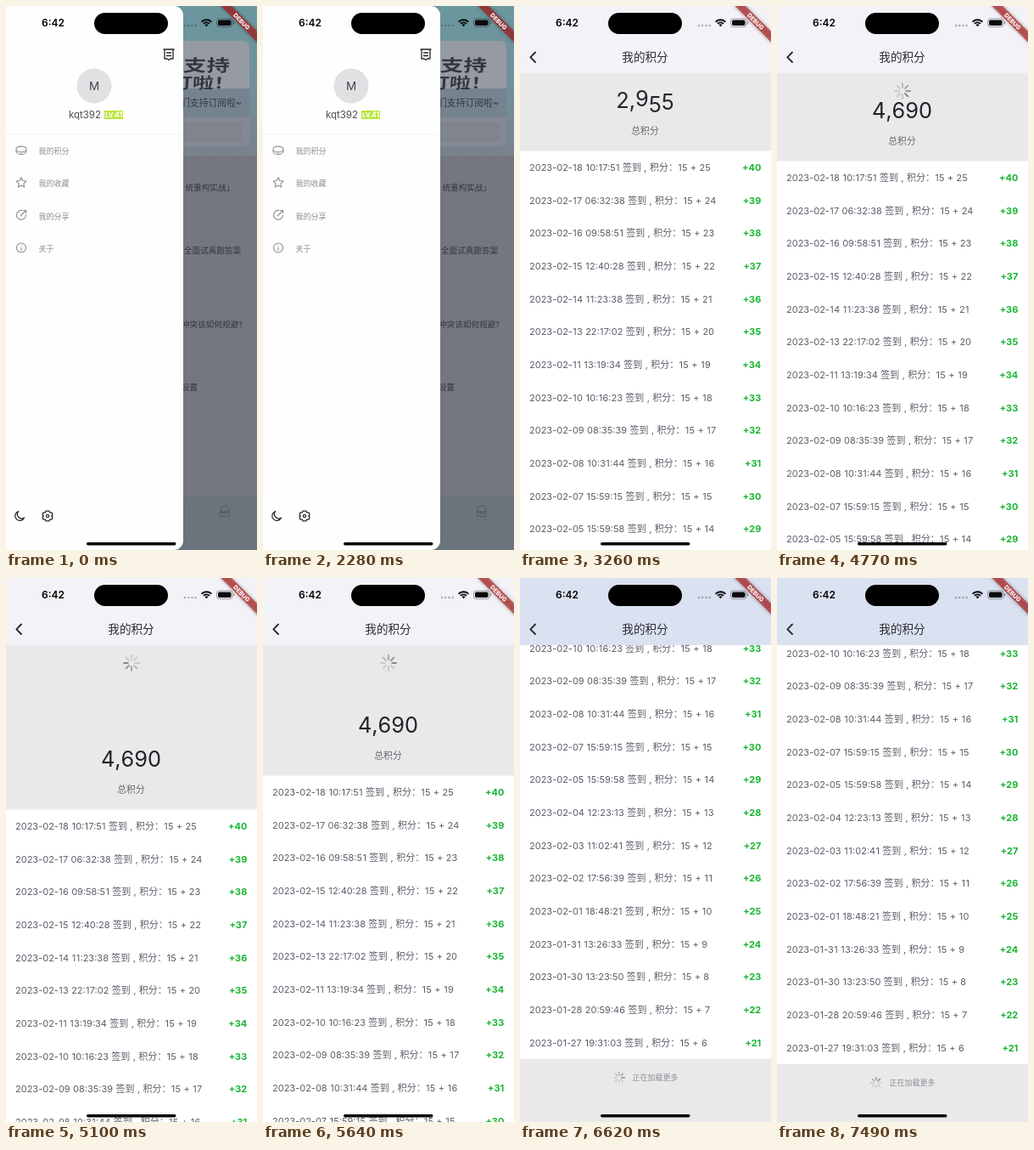
An HTML page with a canvas that plays this animation: 296x640 px, repeating every 7.57 s.

```html
<!DOCTYPE html>
<html lang="zh">
<head>
<meta charset="utf-8">
<title>我的积分</title>
<style>
html, body { margin: 0; width: 100%; height: 100%; overflow: hidden; background: #fff; }
canvas { display: block; width: 296px; height: 640px; }
</style>
</head>
<body>
<canvas id="stage"></canvas>
<script>
const W = 296, H = 640, LOOP = 7570;
const FONT = 'Inter, "Noto Sans CJK SC", "Noto Sans CJK", sans-serif';
const ROW = 38.66, BAR = 79, HEAD = 91.5;
const PAGE = '#e9e9ea', INK = '#23242b';

const canvas = document.getElementById('stage');
const c = canvas.getContext('2d');
const dpr = window.devicePixelRatio || 1;
canvas.width = W * dpr;
canvas.height = H * dpr;

const dates = `02-18 10:17:51,02-17 06:32:38,02-16 09:58:51,02-15 12:40:28,02-14 11:23:38,
02-13 22:17:02,02-11 13:19:34,02-10 10:16:23,02-09 08:35:39,02-08 10:31:44,
02-07 15:59:15,02-05 15:59:58,02-04 12:23:13,02-03 11:02:41,02-02 17:56:39,
02-01 18:48:21,01-31 13:26:33,01-30 13:23:50,01-28 20:59:46,01-27 19:31:03`.split(',').map(s => s.trim());

// The screen refreshes in discrete steps
const run = (start, n, step) => Array.from({ length: n }, (_, i) => start + i * step);
const ticks = [0, ...run(2280, 4, 103.3), 2840, ...run(3150, 4, 110), 3630,
  ...run(3780, 4, 110), ...run(4770, 7, 110), ...run(5530, 7, 108.3),
  ...run(6290, 7, 110), ...run(7060, 5, 107.5)];

const scrollKeys = [[4660, 0], [4770, 12], [4880, 42], [4990, 78], [5100, 102], [5210, 108],
  [5320, 84], [5430, 68], [5530, 63], [5640, 62], [5860, 62], [5970, 46], [6070, 18], [6180, 3],
  [6290, -40], [6400, -170], [6510, -300], [6620, -378], [6730, -392], [6840, -386],
  [6950, -378], [7060, -373.5], [7170, -371.8]];

const clamp = (v, a = 0, b = 1) => Math.min(b, Math.max(a, v));

function track(keys, t) {
  if (t <= keys[0][0]) return keys[0][1];
  for (let i = 1; i < keys.length; i++) {
    const [t0, v0] = keys[i - 1], [t1, v1] = keys[i];
    if (t <= t1) return v0 + (v1 - v0) * (t - t0) / (t1 - t0);
  }
  return keys[keys.length - 1][1];
}

function text(s, x, y, size, color, align = 'left', weight = 400) {
  c.font = `${weight} ${size}px ${FONT}`;
  c.textAlign = align;
  c.textBaseline = 'alphabetic';
  c.fillStyle = color;
  c.fillText(s, x, y + size * 0.365);
}

// Running text with looser word gaps and a little air around each 1
function looseText(s, x, y, size, color) {
  const air = size * 0.025;
  c.wordSpacing = '0.3px';
  for (const part of s.split(/(1)/)) {
    const pad = part === '1' ? air : 0;
    text(part, x + pad, y, size, color);
    x += c.measureText(part).width + pad * 2;
  }
  c.wordSpacing = '0px';
}

function rect(x, y, w, h, color) {
  c.fillStyle = color;
  c.fillRect(x, y, w, h);
}

function round(x, y, w, h, r, color) {
  c.beginPath();
  c.roundRect(x, y, w, h, r);
  c.fillStyle = color;
  c.fill();
}

function disc(x, y, r, color) {
  c.beginPath();
  c.arc(x, y, r, 0, 7);
  c.fillStyle = color;
  c.fill();
}

function stroke(d, color, width = 1) {
  c.strokeStyle = color;
  c.lineWidth = width;
  c.lineCap = c.lineJoin = 'round';
  c.stroke(new Path2D(d));
}

function at(x, y, draw) {
  c.save();
  c.translate(x, y);
  draw();
  c.restore();
}

function spinner(x, y, r, t) {
  const head = Math.floor(t / 125 + 5.5);
  at(x, y, () => {
    for (let i = 0; i < 8; i++) {
      const age = (((head - i) % 8) + 8) % 8;
      const alpha = Math.max(47, 147 - age * 25) / 255;
      round(-r * 0.1, -r, r * 0.2, r * 0.67, r * 0.1, `rgba(60,60,67,${alpha})`);
      c.rotate(Math.PI / 4);
    }
  });
}

function backdrop() {
  rect(0, 0, W, H, '#74777e');
  const sky = c.createLinearGradient(0, 0, 0, 176);
  sky.addColorStop(0, '#6b979f');
  sky.addColorStop(0.6, '#718f9a');
  sky.addColorStop(1, '#7a828c');
  rect(0, 0, W, 176, sky);
  round(10, 41, 277, 124, 7, '#858993');
  round(10, 41, 277, 62, [7, 7, 0, 0], '#969aa3');
  rect(10, 97, 277, 34, '#75838f');
  round(20, 136, 259, 24, 6, '#7f848d');
  const ink = '#34363f';
  const headline = (s, x, y, size) => at(x, y, () => {
    c.transform(1.25, 0, -0.06, 0.9, 0, 0);
    text(s, 0, 0, size, ink, 'right', 700);
  });
  headline('支持', 264, 70, 22);
  headline('订啦！', 270, 90, 20);
  text('们支持订阅啦~', 278, 114, 10.8, ink, 'right');
  text('统重构实战」', 269, 213, 9.6, ink, 'right');
  text('全面试真题答案', 277, 287, 9.6, ink, 'right');
  text('冲突该如何规避?', 279, 374, 9.6, ink, 'right');
  text('设置', 226, 448, 9.6, ink, 'right');
  rect(0, 577, W, 63, '#6b737d');
  at(258, 594, () => stroke('M-5 6V-1A5 5 0 0 1 5 -1V6ZM-5 1H5M-2 1V3H2V1', '#4f5763', 1));
}

function drawer(t) {
  round(0, 0, 209, H, [0, 11, 11, 0], '#fefefe');
  at(192, 57, () => stroke('M-6 -6H6M-5 -6V5H-2L0 6.5L2 5H5V-6M-2.5 -2H2.5M-2.5 1.5H2.5', INK, 1.3));
  disc(104, 94, 20.5, '#e1e1e4');
  text('M', 104, 94, 13.5, '#45464d', 'center');
  text('kqt392', 112, 128, 11.5, '#4c4d55', 'right');
  rect(116, 123, 22, 10, '#b9e63a');
  text('LV.', 117, 128, 7.5, '#fff', 'left', 800);
  text('41', 137.5, 128, 9, '#f8ffe0', 'right', 800);
  rect(0, 150.5, 209, 0.7, '#f0f0f2');

  if (t >= 2280) disc(111, 168, t < 2380 ? 1.2 : 60 * clamp((t - 2280) / 250), 'rgba(0,0,0,.04)');

  const gray = '#8c8d95';
  ['我的积分', '我的收藏', '我的分享', '关于'].forEach((s, i) => text(s, 38.5, 170.5 + i * 38.5, 9, gray));
  at(18, 169.5, () => stroke('M-6 -1A6 3.4 0 0 1 6 -1A6 3.4 0 0 1 -6 -1V1.5A6 3.4 0 0 0 6 1.5V-1', gray, 1.1));
  at(18, 208, () => {
    let d = '';
    for (let i = 0; i < 10; i++) {
      const a = i * Math.PI / 5 - Math.PI / 2, r = i % 2 ? 3 : 6.3;
      d += (i ? 'L' : 'M') + r * Math.cos(a) + ' ' + r * Math.sin(a);
    }
    stroke(d + 'Z', gray, 1.1);
  });
  at(18, 246, () => stroke('M1 -5.5A5.5 5.5 0 1 0 5.5 0M-1 1L5.5 -5.5M2.5 -5.5H5.5V-2.5', gray, 1.1));
  at(18, 284.5, () => stroke('M5.5 0A5.5 5.5 0 1 1 -5.5 0A5.5 5.5 0 1 1 5.5 0M0 -0.5V3M0 -2.8V-2.7', gray, 1.1));
  at(16, 600, () => stroke('M-1.5 -5.5A5.6 5.6 0 1 0 5.5 2A5.2 5.2 0 0 1 -1.5 -5.5Z', INK, 1.3));
  at(49, 600, () => {
    stroke('M-2 -5.8H2L2.6 -4L5 -4.2L6 -1L4.6 0L6 1.2L5 4.2L2.6 4L2 5.8H-2L-2.6 4L-5 4.2L-6 1.2L-4.6 0L-6 -1L-5 -4.2L-2.6 -4Z', INK, 1.2);
    stroke('M1.6 0A1.6 1.6 0 1 1 -1.6 0A1.6 1.6 0 1 1 1.6 0', INK, 1.2);
  });
}

function counter(t, y) {
  const size = 25.4;
  if (t < 2800) return text('0', 147.5, y, size, INK, 'center');
  const x = clamp((t - 2712.5) / 1397.5);
  const p = 1 - (1 - x) ** 2;
  const s = String(Math.round(4690 * p)).padStart(4, '0');
  const glyphs = [s[0], ',', s[1], s[2], s[3]];
  const roll = p < 0.999 ? [0, 0, -2.5, 5, 2] : [0, 0, 0, 0, 0];
  c.save();
  c.beginPath();
  c.rect(100, y - 16, 96, 30);
  c.clip();
  c.font = `400 ${size}px ${FONT}`;
  const widths = glyphs.map(g => c.measureText(g).width);
  let left = 147.5 - widths.reduce((a, b) => a + b) / 2;
  glyphs.forEach((g, i) => {
    text(g, left, y + roll[i], size, INK);
    left += widths[i];
  });
  c.restore();
}

function points(t) {
  const scroll = track(scrollKeys, t);
  rect(0, 0, W, H, PAGE);
  if (scroll > 8) spinner(148, 100, 10, t);
  counter(t, 111.2 + scroll);
  text('总积分', 147.5, 147.3 + scroll, 10.8, '#66676e', 'center');

  const top = BAR + HEAD + scroll;
  if (t < 3150) {
    spinner(148, 407, 10, t);
  } else {
    rect(0, top, W, ROW * dates.length, '#fff');
    dates.forEach((d, i) => {
      const y = top + ROW * i + 19.5;
      if (y < 60 || y > H + 10) return;
      looseText(`2023-${d} 签到 , 积分：15 + ${25 - i}`, 11, y, 11, '#5b5d69');
      text(`+${40 - i}`, 284.3, y, 11, '#16b530', 'right', 700);
    });
    const end = top + ROW * dates.length;
    if (end < H) {
      spinner(117, end + 22, 7, t);
      text('正在加载更多', 132.6, end + 22.3, 9, '#8e8f97');
    }
  }

  rect(0, 0, W, BAR, scroll < 0 ? '#dae1f0' : '#f2f2f7');
  stroke('M18 54.5L12.3 60.3L18 66', INK, 1.8);
  text('我的积分', 147.5, 60, 13.6, '#2d2e35', 'center');
}

function chrome() {
  text('6:42', 55.5, 20, 12, '#000', 'center', 600);
  round(104, 8, 87, 25, 12.5, '#000');
  for (let i = 0; i < 4; i++) disc(211 + i * 4.2, 23, 1.2, 'rgba(60,60,67,.4)');
  at(236.5, 24.2, () => {
    c.strokeStyle = '#0a0a0c';
    c.lineCap = 'butt';
    c.lineWidth = 2;
    for (const r of [8, 4.8]) {
      c.beginPath();
      c.arc(0, 0, r, -Math.PI * 0.76, -Math.PI * 0.24);
      c.stroke();
    }
    c.beginPath();
    c.moveTo(0, 0);
    c.arc(0, 0, 2.8, -Math.PI * 0.76, -Math.PI * 0.24);
    c.fillStyle = '#0a0a0c';
    c.fill();
  });
  c.beginPath();
  c.roundRect(248.5, 15, 18.5, 9.6, 3);
  c.strokeStyle = 'rgba(0,0,0,.4)';
  c.lineWidth = 0.9;
  c.stroke();
  round(250, 16.5, 15.5, 6.6, 1.8, '#0a0a0c');
  round(268, 18.2, 1.2, 3.2, 0.6, 'rgba(0,0,0,.4)');
  round(95, 631, 105.5, 3.6, 1.8, '#000');

  at(W, 0, () => {
    c.rotate(Math.PI / 4);
    c.shadowColor = 'rgba(0,0,0,.5)';
    c.shadowBlur = 4 * dpr;
    rect(-32, 21.1, 64, 9, 'rgba(183,28,28,.63)');
    c.shadowColor = 'transparent';
    text('DEBUG', 0, 25.6, 7, '#fff', 'center', 800);
  });
}

function render(now) {
  const raw = now % LOOP;
  const t = ticks.filter(k => k <= raw + 0.5).pop();
  c.setTransform(dpr, 0, 0, dpr, 0, 0);
  c.clearRect(0, 0, W, H);
  const slide = t < 2300 ? 1 : (1 - clamp((t - 2300) / 289)) ** 2;
  if (slide > 0) {
    at(-(1 - slide) * W / 3, 0, () => {
      backdrop();
      drawer(t);
    });
  }
  if (slide < 1) {
    at(slide * W, 0, () => {
      c.beginPath();
      c.rect(0, 0, W, H);
      c.clip();
      points(t);
    });
  }
  chrome();
}

const start = performance.now();
function loop() {
  render(performance.now() - start);
  requestAnimationFrame(loop);
}
loop();
</script>
</body>
</html>
```
